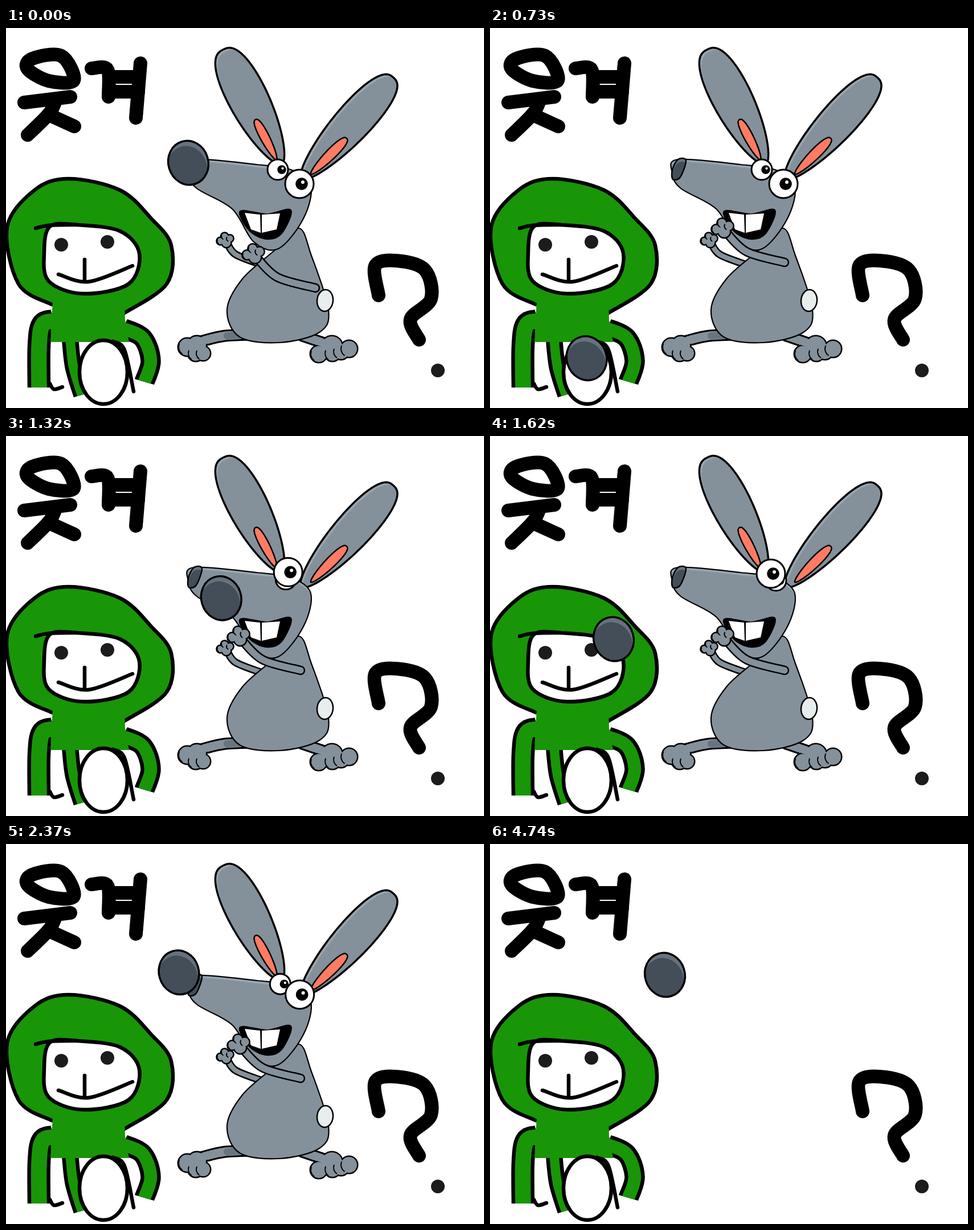
These frames come from a looping animation (839x668 px, 5.81 s). An HTML page with a canvas:

```html
<!DOCTYPE html>
<html lang="ko">
<head>
<meta charset="utf-8">
<title>웃겨</title>
<style>
html, body { margin: 0; width: 100%; height: 100%; overflow: hidden; background: #fff; }
canvas { display: block; }
</style>
</head>
<body>
<canvas id="stage" width="839" height="668"></canvas>
<script>
const ctx = document.getElementById('stage').getContext('2d');
const LOOP = 5810, VANISH = 4740, STEP = 30;
const GRAY = '#84919b', LIGHT = '#98a5ae', SHADE = '#68747e', SLATE = '#434e59';
const GREEN = '#189607', PINK = '#ff7b64', INK = '#000', SOFT = '#1c1b1d', WHITE = '#fff';

const pairs = text => {
  const n = text.trim().split(/\s+/).map(Number);
  return n.filter((_, i) => i % 2 === 0).map((x, i) => [x, n[2 * i + 1]]);
};

// Smooth curve through a few points
function curve(text, closed = false) {
  const p = pairs(text), n = p.length, path = new Path2D();
  const at = i => closed ? p[(i + n) % n] : p[Math.max(0, Math.min(n - 1, i))];
  path.moveTo(...p[0]);
  for (let i = 0; i < (closed ? n : n - 1); i++) {
    const [a, b, c, d] = [at(i - 1), at(i), at(i + 1), at(i + 2)];
    path.bezierCurveTo(b[0] + (c[0] - a[0]) / 6, b[1] + (c[1] - a[1]) / 6,
      c[0] - (d[0] - b[0]) / 6, c[1] - (d[1] - b[1]) / 6, c[0], c[1]);
  }
  if (closed) path.closePath();
  return path;
}
const ring = text => curve(text, true);

function poly(text) {
  const path = new Path2D();
  pairs(text).forEach(p => path.lineTo(...p));
  path.closePath();
  return path;
}

function oval(x, y, rx, ry = rx, turn = 0) {
  const path = new Path2D();
  path.ellipse(x, y, rx, ry, turn, 0, 7);
  return path;
}

// Petal from base to tip, widest past the middle
function leaf(x0, y0, x1, y1, half) {
  const path = new Path2D(), dx = x1 - x0, dy = y1 - y0, len = Math.hypot(dx, dy);
  for (let i = 0; i <= 120; i++) {
    const a = i / 120 * 2 * Math.PI, u = (1 - Math.cos(a)) / 2;
    const w = 1.92 * half * u ** 0.6 * (1 - u) ** 0.38 * Math.sign(Math.sin(a)) / len;
    path.lineTo(x0 + dx * u - dy * w, y0 + dy * u + dx * w);
  }
  path.closePath();
  return path;
}

function fill(path, color) {
  ctx.fillStyle = color;
  ctx.fill(path);
}

function line(path, width, color = INK) {
  ctx.lineWidth = width;
  ctx.strokeStyle = color;
  ctx.stroke(path);
}

function shape(path, color, width = 3) {
  fill(path, color);
  line(path, width);
}

function shift(dx, dy, draw) {
  ctx.save();
  ctx.translate(dx, dy);
  draw();
  ctx.restore();
}

// Shape with a bright rim on the side away from the offset
function lit(path, color, rim, dx, dy, width) {
  fill(path, rim);
  ctx.save();
  ctx.clip(path);
  shift(dx, dy, () => fill(path, color));
  ctx.restore();
  line(path, width);
}

function tube(path, width, color, rim) {
  line(path, width + rim);
  line(path, width - rim, color);
}

// Round parts merged under one outline, with a crease beside each
function paw(parts) {
  parts.forEach(p => line(oval(...p), 5));
  parts.forEach(p => fill(oval(...p), GRAY));
  parts.slice(1).forEach(([x, y, r]) => {
    const crease = new Path2D();
    crease.arc(x, y, r, 2.2, 3.5);
    line(crease, 2);
  });
}

// Monotone interpolation of [time, x, y] keys
function track(keys, t) {
  const last = keys.length - 1;
  if (t <= keys[0][0]) return keys[0].slice(1);
  if (t >= keys[last][0]) return keys[last].slice(1);
  const i = keys.findIndex(k => k[0] > t) - 1;
  const span = keys[i + 1][0] - keys[i][0], u = (t - keys[i][0]) / span;
  const slope = (j, d) => (keys[j + 1][d] - keys[j][d]) / (keys[j + 1][0] - keys[j][0]);
  const tangent = (j, d) => {
    if (j === 0 || j === last) return 0;
    const a = slope(j - 1, d), b = slope(j, d);
    return a * b <= 0 ? 0 : 2 * a * b / (a + b);
  };
  return [1, 2].map(d => {
    const a = keys[i][d], b = keys[i + 1][d];
    return a + (b - a) * u * u * (3 - 2 * u) + span * u * (1 - u) *
      ((1 - u) * tangent(i, d) - u * tangent(i + 1, d));
  });
}

const moves = {
  nose: [[100, 320, 237], [460, 297, 625], [700, 196, 597], [860, 37, 380], [985, 200, 83],
    [1050, 318, 112], [1290, 380, 262], [1480, 320, 397], [1620, 217, 357], [1890, 82, 268],
    [1950, 38, 224], [2010, 70, 180], [2140, 160, 115], [2400, 307, 230]],
  bigEye: [[960, 515, 274], [1450, 491, 232], [1620, 493, 242], [2010, 494, 243], [2400, 516, 265]],
  smallEye: [[960, 477, 249], [1620, 502, 254], [2010, 502, 254], [2400, 481, 246]],
  frontArm: [[100, 26, 45], [430, 0, 0], [2640, 0, 0], [2760, 0, -19], [2970, 0, 14]],
  backArm: [[2640, 0, 0], [2970, 7, 22]]
};

const letters = [
  ring('46 54 97 49 119 92 75 93 38 72'),
  ...['32 131 113 121', '88 125 76 150 38 188', '74 152 120 173', '150 71 178 73 180 121',
    '188 86 232 86', '188 112 232 112', '236 62 228 158'].map(s => curve(s))
];
const query = curve('654 470 648 418 685 409 735 425 746 476 710 512 725 548');

const hood = curve('80 486 22 450 2 350 50 285 110 265 200 285 255 335 290 382 282 450 208 501');
const limbs = [['85 515 64 522 58 560 58 632', 34], ['112 540 118 595 133 645', 23],
  ['205 528 240 545 254 585 243 622', 29]].map(([s, w]) => [curve(s), w]);
const face = ring('77 349 125 346 200 357 234 396 215 450 135 467 75 445 67 395');
const scribbles = ['52 352 75 347 125 346', '138 407 138 444', '92 433 145 446 222 418',
  '188 551 208 566 224 639', '77 625 84 635 99 631'].map(s => curve(s));

const ears = [leaf(484, 240, 381, 38, 35), leaf(518, 266, 680, 87, 32)];
const pinks = [leaf(475, 232, 438, 161, 8), leaf(535, 257, 598, 194, 9)];
const torso = ring('470 392 415 441 388 495 410 543 480 553 550 535 566 495 536 400 514 352');
const head = ring('330 231 440 240 500 249 535 277 522 335 478 388 435 376 397 318 335 282 320 255');
const tip = ring('330 231 344 233 334 262 321 266 320 250');
const mouth = ring('411 322 458 327 500 320 484 361 457 371 427 356');
const teeth = ['419 325 446 328 447 360 430 354', '449 328 481 326 475 354 449 360'].map(poly);
const legs = ['438 539 385 541 345 550', '520 541 570 558'].map(s => curve(s));
const arms = { back: curve('388 378 403 398 446 415'), front: curve('412 356 450 393 517 412') };

function drawText() {
  letters.forEach(s => line(s, 24));
  line(query, 24);
  fill(oval(758, 602, 12), SOFT);
}

function drawHooded() {
  fill(hood, GREEN);
  line(hood, 6.5);
  ctx.lineCap = 'butt';
  limbs.forEach(([path, w]) => tube(path, w, GREEN, 6.5));
  ctx.lineCap = 'round';
  fill(poly('82 478 208 478 209 514 216 552 78 552'), GREEN);
  shape(oval(171, 605, 42, 56), WHITE, 6.5);
  shape(face, WHITE, 6.5);
  scribbles.forEach(s => line(s, 6.5));
  [[97, 381], [178, 376]].forEach(([x, y]) => fill(oval(x, y, 12), SOFT));
}

function drawHand(x, y, k) {
  paw([[1, 6, 10], [-13, 2, 7.5], [-3, -9, 7.5], [9, -4, 7.5]]
    .map(([dx, dy, r]) => [x + dx * k, y + dy * k, r * k]));
}

function drawFeet() {
  legs.forEach(s => tube(s, 18, GRAY, 3));
  line(curve('388 541 430 539'), 14, SHADE);
  paw([[335, 558, 16], [318, 561, 15], [333, 572, 13], [346, 572, 12]]);
  paw([[572, 560, 18], [549, 573, 14], [573, 572, 13], [588, 569, 13], [602, 564, 14]]);
  legs.forEach(s => line(s, 14, GRAY));
  line(curve('388 541 430 539'), 12, SHADE);
}

function drawEye([x, y], r, look) {
  shape(oval(x, y, r), WHITE);
  fill(oval(x + look, y, r * 0.43), INK);
  fill(oval(x + look + r * 0.08, y - r * 0.12, r * 0.12), WHITE);
}

function drawNose([x, y]) {
  shift(x, y, () => lit(oval(0, 0, 35, 39, -0.3), SLATE, '#66727d', -2, 9, 3.5));
}

function drawRabbit(t) {
  const at = name => track(moves[name], t);
  shift(...at('backArm'), () => {
    tube(arms.back, 11, GRAY, 2.5);
    drawHand(386, 373, 0.75);
  });
  drawFeet();
  ears.forEach(e => lit(e, GRAY, LIGHT, 4, 4, 3.5));
  pinks.forEach(p => shape(p, PINK, 2.5));
  shape(torso, GRAY, 2.2);
  lit(head, GRAY, LIGHT, 0, 5, 2.2);
  lit(tip, SLATE, SHADE, 0, 6, 2.5);
  shape(mouth, INK, 2);
  teeth.forEach(s => fill(s, WHITE));
  shift(...at('frontArm'), () => {
    tube(arms.front, 14, GRAY, 2.5);
    drawHand(410, 352, 1);
  });
  shape(oval(560, 479, 14, 19, 0.1), '#e8eded', 2.5);
  drawEye(at('smallEye'), 18, 7);
  drawEye(at('bigEye'), 25, 4);
}

function draw(time) {
  const base = time < 1050 ? 130 : 1050;
  const t = base + Math.floor((time - base) / STEP) * STEP;
  ctx.fillStyle = WHITE;
  ctx.fillRect(0, 0, 839, 668);
  ctx.lineCap = ctx.lineJoin = 'round';
  drawText();
  drawHooded();
  if (time < VANISH) drawRabbit(t);
  drawNose(track(moves.nose, t));
}

const start = performance.now();
function tick() {
  draw((performance.now() - start) % LOOP);
  requestAnimationFrame(tick);
}
tick();
</script>
</body>
</html>
```
